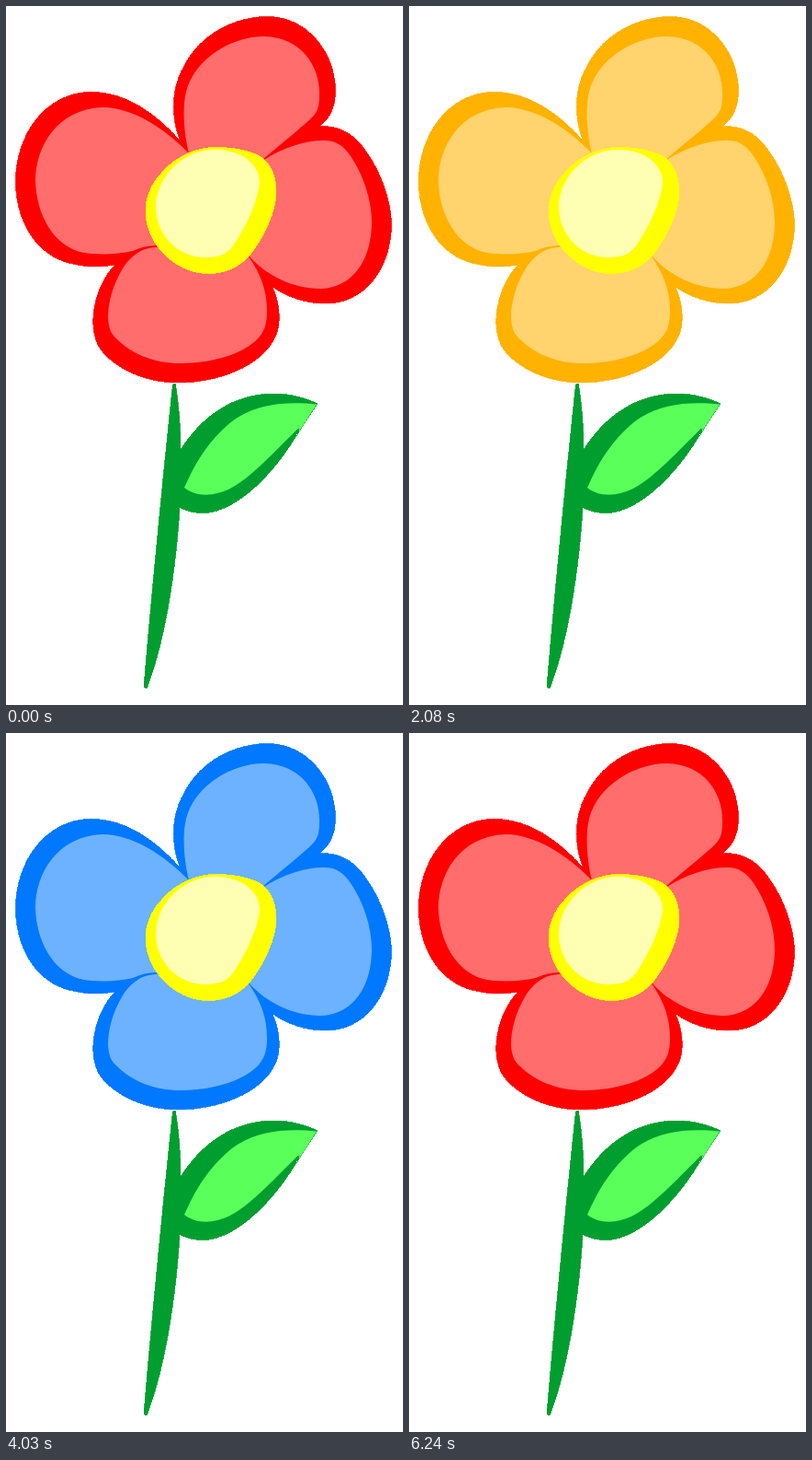
Recreate the animation shown at these times as an HTML page. Size 432 by 759 pixels, loop 6.37 s.

```html
<!DOCTYPE html>
<html lang="en">
<head>
<meta charset="utf-8">
<title>Colour-changing flower</title>
<style>
  html, body { margin: 0; width: 100%; height: 100%; overflow: hidden; background: #fff; }
  svg { display: block; width: 100vw; height: 100vh; }

  /* hard, slightly full edges against the white */
  .edge { shape-rendering: crispEdges; stroke-width: .8; }

  /* 49 ticks of 130 ms; each step count is the number of ticks to the next stop */
  .petals { color: #f00; animation: bloom 6370ms infinite; }
  .tint { fill: #fff; fill-opacity: .426; }

  @keyframes bloom {
    0%        { color: #f00;    animation-timing-function: steps(7); }
    14.28571% { color: #a32076; animation-timing-function: steps(9); }
    32.65306% { color: #ffb200; animation-timing-function: steps(2); }
    36.73469% { color: #ff0;    animation-timing-function: steps(6); }
    48.97959% { color: #0f0;    animation-timing-function: steps(5); }
    59.18367% { color: #0ff;    animation-timing-function: steps(2); }
    63.26531% { color: #0078ff; animation-timing-function: steps(5); }
    73.46939% { color: #00f;    animation-timing-function: steps(6); }
    85.71429% { color: #9600ff; animation-timing-function: steps(2); }
    89.79592% { color: #f0f;    animation-timing-function: steps(4); }
    97.95918%, 100% { color: #f00; }
  }
</style>
</head>
<body>
<svg viewBox="0 0 432 759" preserveAspectRatio="none">
  <!-- stem and leaf -->
  <g class="edge" fill="#009e2f" stroke="#009e2f">
    <path d="M181.500 411Q183 409 184.500 411C188 433 190 458 190 482L189 544C185 612 173 690 153.500 740Q151.500 742 150 739.500C158 645 170 520 181.500 411Z"/>
    <path d="M189 483.500C212 446 247 421 292 421C310 421 326 426 338.500 431.500L320 459.500C296 503 252 550.500 214 550.500C204 550.500 196 548 188 544Z"/>
  </g>
  <path fill="#5aff5a" d="M338 432.500C296 428 263 435 240 456C218 476 205 498 194 523C208 534 227 532 243 524.500C267 512 291 485 317.500 459L320.500 459.500Z"/>

  <!-- petals -->
  <g class="petals">
    <path class="edge" fill="currentColor" stroke="currentColor" d="M190 147C179 122 180 88 193.500 66C210 31 249 11.500 285 11.500C331 12 358.500 54 358.500 92C358 112 352 122 341 131C362 129 378 139 389 154C408 179 419.500 212 419.500 240C417 291 387 323 348 323C326 323 306 316 290 305C297 321 300 342 294 357C280 392 229 409 187 409C150 409 117 392 103 373C87 350 96 303 119 281C106 283 92 284 78 281C33 275 10.500 233 10.500 190C11 139 43 94 92 93.500C132 93 165 119 190 147Z"/>
    <g class="tint">
      <path d="M199 160C194 140 192 115 195 98C202 58 245 33 281 33C322 34 342 66 341 97C341 110 339 116 330 124C312 140 295 153 279 167L230 190Z"/>
      <path d="M279 168C302 153 326 146 346 146C360 146 367 152 375 163C389 184 398 210 398 236C397 282 373 306 342 307C313 307 283 293 264 271L240 220Z"/>
      <path d="M163 262C145 263 135 273 127 285C116 303 111 322 111 339C112 351 114 356 121 362C137 378 161 388 190 388C222 388 253 379 270 365C282 355 284 344 284 331C284 310 278 292 264 272L220 240Z"/>
      <path d="M199 160C172 132 137 110 105 110C55 112 32 153 32 190C33 229 55 268 94 269C110 270 125 269 138 266C146 262 155 260 163 260L200 220Z"/>
    </g>
  </g>

  <!-- centre -->
  <path class="edge" fill="#ff0" stroke="#ff0" d="M226 153.500C245 153.500 262 156 276 163C289 171 294 186 294 203C293 224 282 249 265 271C253 284 238 290.500 220 290.500C183 290 152 258 152 222C152 188 187 155 226 153.500Z"/>
  <path fill="#ffffb4" d="M230 156C257 157 276 172 276 192C274 212 262 238 248 259C241 270 231 273 217 273C187 273 163 249 163 217C164 186 192 155 230 156Z"/>
</svg>
</body>
</html>
```
